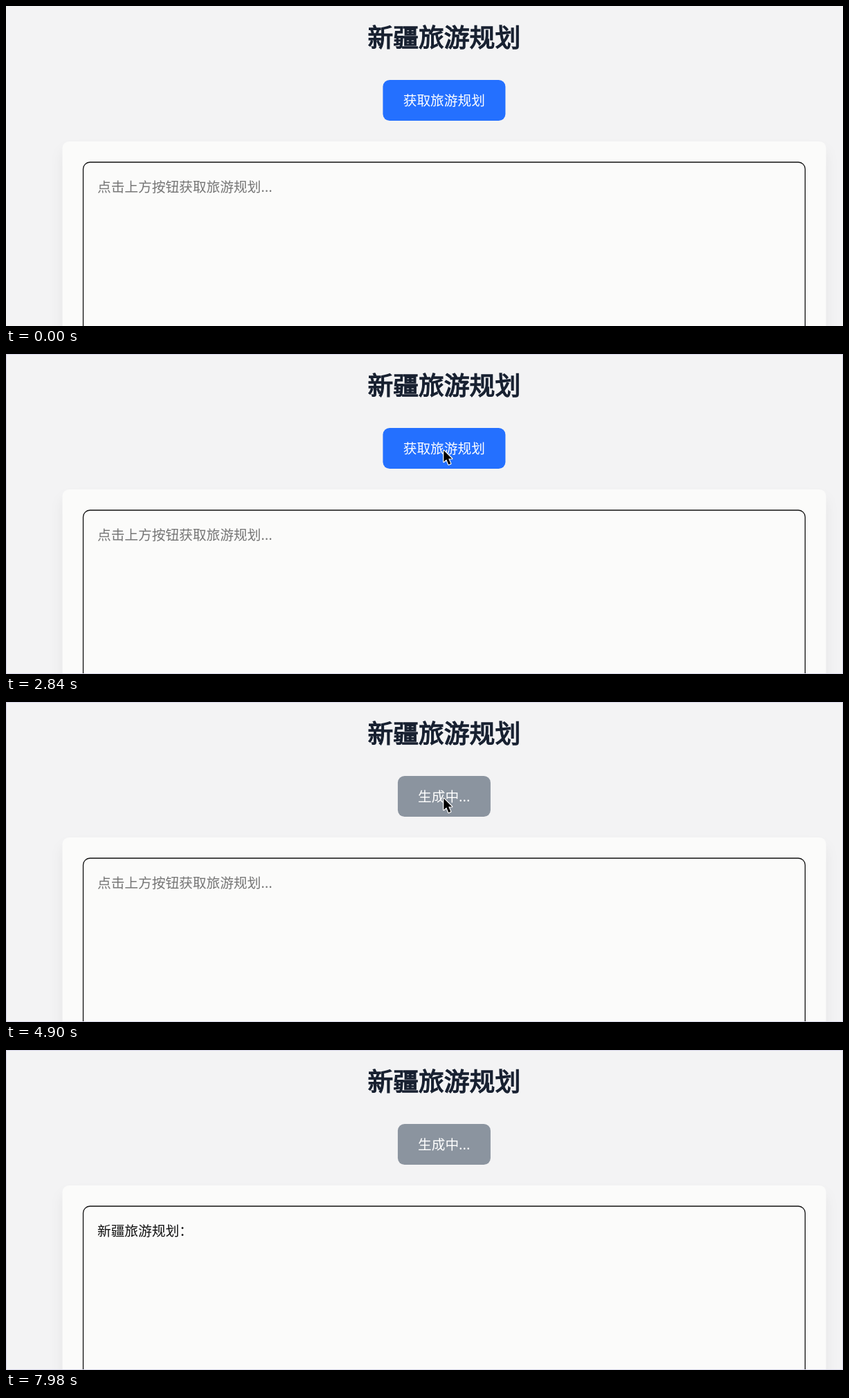
Recreate the animation shown at these times as an HTML page. Size 1209 by 463 pixels, loop 8 s.

```html
<!DOCTYPE html>
<html lang="zh-CN">
<head>
<meta charset="utf-8">
<title>新疆旅游规划</title>
<style>
  html, body { margin: 0; width: 100%; height: 100%; overflow: hidden; background: #f3f3f4; }
  svg { display: block; width: 1209px; height: 463px; }
  text { font: 19.7px "Noto Sans CJK SC", "Noto Sans CJK", sans-serif; }
  /* A thin outline on the regular weight gives a semibold */
  .title { font-size: 36.8px; fill: #182131; stroke: #182131; stroke-width: 1.4; }
  .mid { text-anchor: middle; }
  .card { fill: #fbfbfa; filter: drop-shadow(0 12px 9px rgba(0, 0, 0, .06)); }
  .field { fill: none; stroke: #111; stroke-width: 1.3; }
  .edge { fill: none; stroke: #d6d5e8; }
  .pointer { fill: #000; stroke: #fff; stroke-width: 2.4; stroke-linejoin: round; paint-order: stroke; }
</style>
</head>
<body>
<svg viewBox="0 0 1209 463">
  <rect width="1209" height="463" fill="#f3f3f4"/>
  <text class="title mid" x="632.8" y="59">新疆旅游规划</text>
  <rect id="button" y="107" height="59" rx="9.8"/>
  <text id="label" class="mid" x="632.8" y="144.3" fill="#fff"></text>
  <rect class="card" x="81.5" y="196" width="1103" height="600" rx="9.8"/>
  <rect class="field" x="111.5" y="226" width="1042.8" height="500" rx="9.8"/>
  <text id="content" x="132" y="268.5"></text>
  <rect id="edge" class="edge" x=".5" y=".5" width="1208" height="462"/>
  <path id="pointer" class="pointer" d="M0 0V16.6L3.9 13L7 20.4L10 19.1L6.9 11.9H11.9Z"/>
</svg>
<script>
const LOOP = 8000;
const CLICK = 4180;
const LEAVE = [5200, 5560];
const BLUE = [36, 112, 255], HOVER = [40, 95, 233], GRAY = [139, 148, 159];
// Streamed answer: [time, number of characters shown]
const TOKENS = [[7680, 2], [7760, 4], [7840, 6], [7920, 7]];
const ANSWER = "新疆旅游规划：";

const $ = id => document.getElementById(id);
const button = $("button"), label = $("label"), content = $("content");
const edge = $("edge"), pointer = $("pointer");

const progress = (t, from, to) => Math.min(1, Math.max(0, (t - from) / (to - from)));
const ease = p => p * p * (3 - 2 * p);
const mix = (a, b, p) => a.map((v, i) => v + (b[i] - v) * p);
const show = (el, on) => el.setAttribute("visibility", on ? "visible" : "hidden");
const write = (el, s) => { if (el.textContent !== s) el.textContent = s; };

function drawButton(t) {
  const busy = t >= CLICK;
  const width = busy ? 134 : 177;
  const hovered = mix(BLUE, HOVER, ease(progress(t, 3640, 3940)));
  const color = mix(hovered, GRAY, ease(progress(t, CLICK + 20, CLICK + 320)));
  button.setAttribute("x", 632.9 - width / 2);
  button.setAttribute("width", width);
  button.setAttribute("fill", `rgb(${color.map(Math.round)})`);
  write(label, busy ? "生成中..." : "获取旅游规划");
}

function drawContent(t) {
  const shown = TOKENS.reduce((n, [at, count]) => t >= at ? count : n, 0);
  write(content, shown ? ANSWER.slice(0, shown) : "点击上方按钮获取旅游规划...");
  content.setAttribute("fill", shown ? "#111" : "#757575");
}

function drawPointer(t) {
  const away = ease(progress(t, ...LEAVE));
  pointer.setAttribute("transform", `translate(${632.3 + 30 * away} ${139.5 - 165 * away})`);
  show(pointer, t >= 1540 && t < LEAVE[1]);
  show(edge, t >= 1540);
}

const start = performance.now();
function draw() {
  const t = (performance.now() - start) % LOOP;
  drawButton(t);
  drawContent(t);
  drawPointer(t);
  requestAnimationFrame(draw);
}
draw();
</script>
</body>
</html>
```
